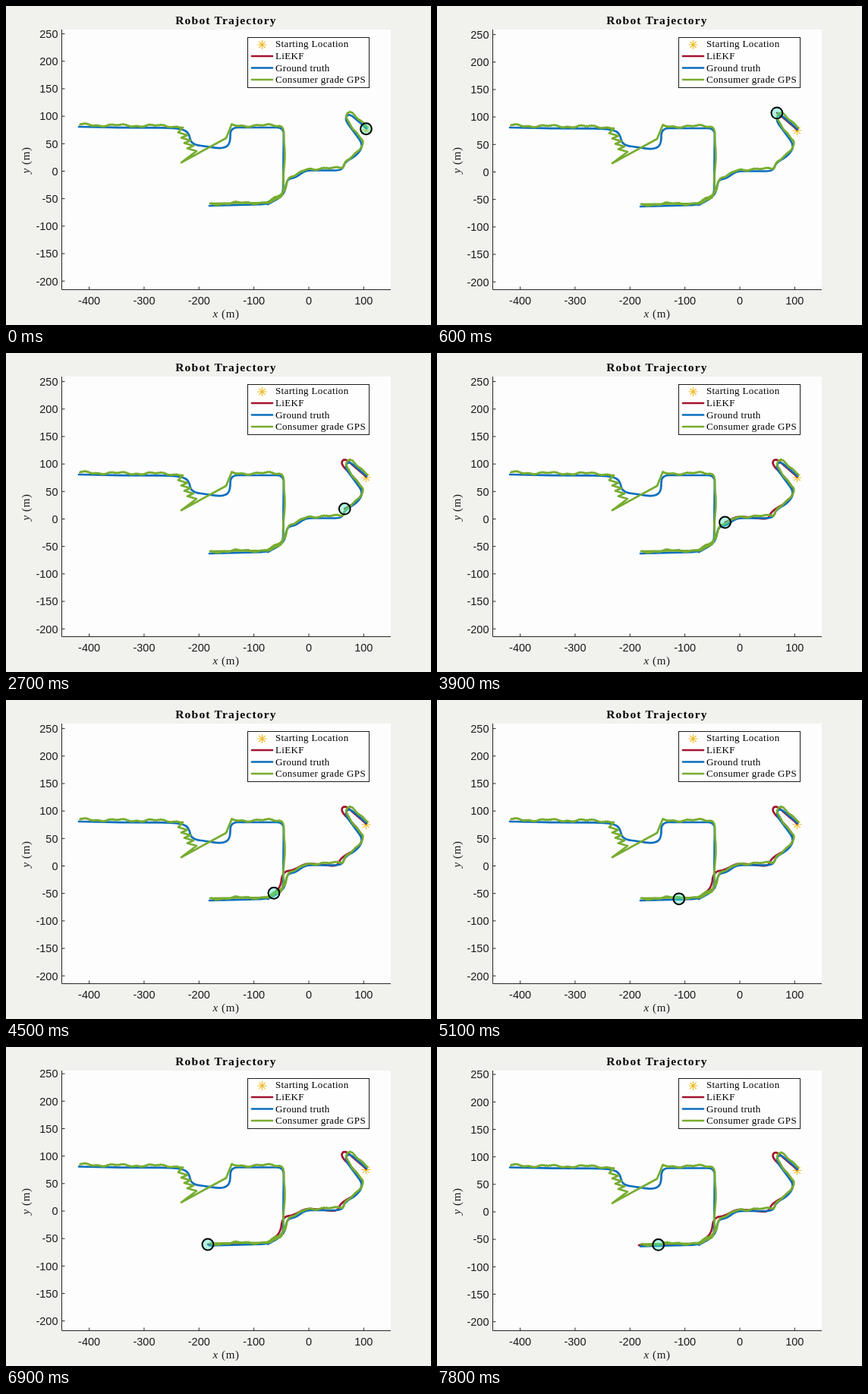
These frames come from a looping animation (560x420 px, 8 s). An HTML page:

```html
<!DOCTYPE html>
<html lang="en">
<head>
<meta charset="utf-8">
<title>Robot Trajectory</title>
<style>
html, body { margin: 0; width: 100%; height: 100%; overflow: hidden; background: #f1f1ee; }
svg { display: block; width: 560px; height: 420px; }
text { fill: #1c1c1c; }
.tick { font: 14.5px "Liberation Sans", Arial, sans-serif; }
.tex { font: 15px "Liberation Serif", Times, serif; letter-spacing: .6px; text-anchor: middle; }
.title { font: bold 15.5px "Liberation Serif", Times, serif; letter-spacing: 1.2px; text-anchor: middle; fill: #000; }
.key { font: 13px "Liberation Serif", Times, serif; letter-spacing: .35px; fill: #000; }
.line { fill: none; stroke-width: 2.7; stroke-linecap: round; stroke-linejoin: round; }
.red { stroke: #a2142f; }
.blue { stroke: #0a6ebd; }
.green { stroke: #77ac30; }
.star { fill: none; stroke: #edb920; stroke-width: 1.1; }
.axis { fill: none; stroke: #262626; }
.i { font-style: italic; }
</style>
</head>
<body>
<svg viewBox="0 0 560 420">
  <defs>
    <path id="star" d="M-6 0H6M0-6V6M-4.2-4.2L4.2 4.2M-4.2 4.2L4.2-4.2"/>
  </defs>
  <rect x="73" y="31" width="434" height="343" fill="#fdfdfd"/>
  <path class="axis" d="M73.5 31V373.5H507"/>
  <g id="xTicks"></g>
  <text class="title" x="290" y="23.5">Robot Trajectory</text>
  <text class="tex" x="290" y="409.5"><tspan class="i">x</tspan> (m)</text>
  <text class="tex" transform="translate(31 203) rotate(-90)"><tspan class="i">y</tspan> (m)</text>

  <g id="data">
    <g id="yTicks"></g>
    <use class="star" href="#star" x="474.5" y="163"/>
    <path id="est" class="line red"/>
    <path id="truth" class="line blue"/>
    <path id="gps" class="line green"/>
    <circle id="robot" r="7.4" fill="#46ebc0" fill-opacity=".42" stroke="#000" stroke-width="2"/>
  </g>

  <rect x="318.5" y="41.5" width="160" height="66" fill="#fefefe" stroke="#1c1c1c"/>
  <use class="star" href="#star" x="337.5" y="51"/>
  <text class="key" x="355" y="54.3">Starting Location</text>
  <g id="keys"></g>
</svg>
<script>
const $ = id => document.getElementById(id);
const { sin, cos, PI, hypot } = Math;
const STEP = 300, LOOP = 8000, SCALE = 0.7235, X0 = 399, Y0 = 217.5;

const add = (id, html) => $(id).insertAdjacentHTML('beforeend', html);
const tick = (id, d, x, y, anchor, label) => add(id,
  `<path class="axis" d="${d}"/><text class="tick" x="${x}" y="${y}" text-anchor="${anchor}">${label}</text>`);

for (let v = -400; v <= 100; v += 100) {
  const x = X0 + v * SCALE;
  tick('xTicks', `M${x} 373.5v-4`, x, 393, 'middle', v);
}
for (let v = -200; v <= 250; v += 50) {
  const y = Y0 - v * SCALE;
  tick('yTicks', `M73.5 ${y}h4`, 68.5, y + 5.3, 'end', v);
}
[['red', 'LiEKF'], ['blue', 'Ground truth'], ['green', 'Consumer grade GPS']].forEach(([color, label], i) => {
  const y = 66 + i * 15.5;
  add('keys', `<path class="line ${color}" d="M324 ${y}H351"/><text class="key" x="355" y="${y + 4}">${label}</text>`);
});

// Corners of the road: the way out, then the way home in three parts
const out = [[475, 161], [452, 141], [446, 149], [471, 183], [463, 196], [446, 206], [443, 216.5],
  [394, 216.5], [382, 226], [370, 228], [367, 248], [345, 261], [268, 263]];
const climb = [[345, 261], [365, 250], [366, 160], [296, 160]];
const dip = [[295, 183], [284, 188], [244, 182], [241, 167]];
const west = [[232, 162], [215, 160.5], [150, 160], [96, 159]];

// Polyline with rounded corners
function road(pts, radius = 9) {
  const toward = (p, q) => {
    const u = Math.min(0.5, radius / hypot(q[0] - p[0], q[1] - p[1]));
    return [p[0] + (q[0] - p[0]) * u, p[1] + (q[1] - p[1]) * u];
  };
  const bends = pts.slice(1, -1).map((p, i) => `L${toward(p, pts[i])}Q${p} ${toward(p, pts[i + 2])}`);
  return `M${pts[0]}${bends.join('')}L${pts.at(-1)}`;
}

// Points along a road, each moved by a sensor error
function sense(pts, error) {
  const path = document.createElementNS('http://www.w3.org/2000/svg', 'path');
  path.setAttribute('d', road(pts));
  const len = path.getTotalLength(), n = Math.round(len);
  return Array.from({ length: n + 1 }, (_, i) => {
    const p = path.getPointAtLength(len * i / n), [dx, dy] = error(i / n, i);
    return [p.x + dx, p.y + dy];
  });
}

const drift = u => [
  -2.5 - 3 * cos(2 * PI * (u - 0.1) / 0.275),
  -1.5 + 4 * (1 - u) * cos(2 * PI * (u - 0.38) / 0.45)
];
const wobble = (u, s) => [
  1 + 0.8 * sin(s * 0.11),
  -2.6 + 1.2 * sin(s * 0.13) + 0.7 * sin(s * 0.37 + 1) + 0.4 * sin(s * 1.9)
];
const zigzag = Array.from({ length: 8 }, (_, i) => [246 - 2 * i + (i % 2 ? -5 : 5), 191 - 3.5 * i]);

const est = sense(out, drift);
const gps = [...sense(out, wobble), ...sense(climb, wobble), [290, 174], [231, 206],
  ...zigzag, ...sense(west, wobble)];

$('truth').setAttribute('d', road(out) + road([...climb, ...dip, ...west]));
$('gps').setAttribute('d', 'M' + gps.join('L'));

// Step number and share of the way out; the robot turns around at the far end
const stops = [[0, 0], [4, 0.18], [7, 0.215], [13, 0.58], [14, 0.66], [17, 0.835],
  [20, 0.93], [22, 1], [23, 1], [26, 0.908]];

function travelled(k) {
  const i = Math.max(1, stops.findIndex(s => s[0] >= k));
  const [k0, u0] = stops[i - 1], [k1, u1] = stops[i];
  return u0 + (u1 - u0) * (k - k0) / (k1 - k0);
}

// The vertical axis settles slightly as the limits adapt
const shift = k => k < 2 ? 0 : k < 19 ? 1 : k < 25 ? -1.5 : -0.5;

function show(k) {
  const i = Math.round(travelled(k) * (est.length - 1));
  const seen = k > 22 ? est : est.slice(0, i + 1);
  $('est').setAttribute('d', k ? 'M' + seen.join('L') : '');
  $('robot').setAttribute('cx', est[i][0]);
  $('robot').setAttribute('cy', est[i][1]);
  $('data').setAttribute('transform', `translate(0 ${shift(k)})`);
}

const start = performance.now();
let last = -1;
function frame() {
  const k = Math.floor((performance.now() - start) % LOOP / STEP);
  if (k !== last) show(last = k);
  requestAnimationFrame(frame);
}
frame();
</script>
</body>
</html>
```
